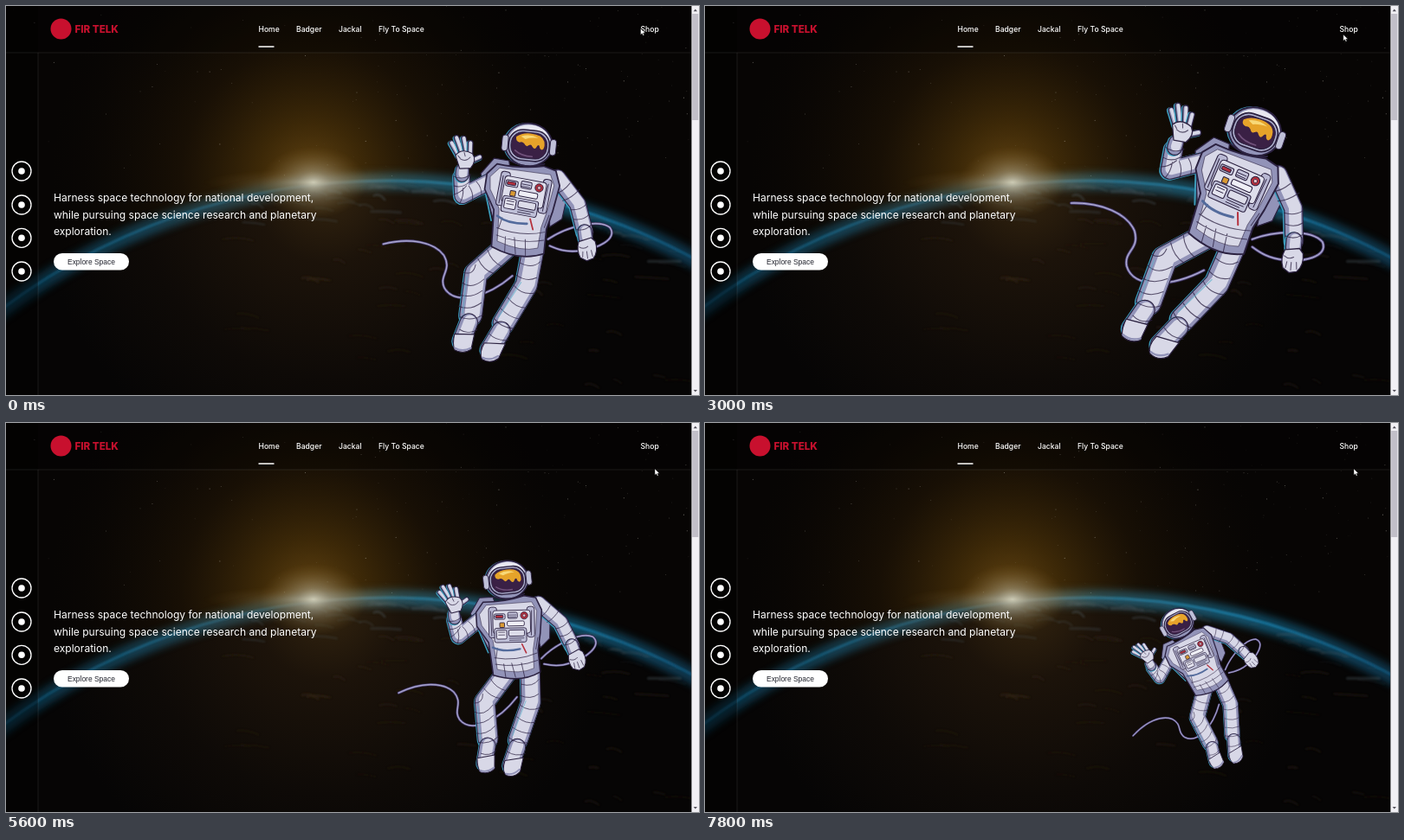
An HTML page that plays this animation: 800x450 px, repeating every 8 s.

```html
<!DOCTYPE html>
<html lang="en">
<head>
<meta charset="utf-8">
<title>Space landing page</title>
<style>
  html, body { margin: 0; width: 100%; height: 100%; overflow: hidden; background: #050404; }
  svg { display: block; width: 100%; height: 100%; }
  text { font-family: Inter, sans-serif; fill: #fff; }
  .round { fill: none; stroke-linecap: round; stroke-linejoin: round; }
  .nav { font-size: 8.6px; font-weight: 500; }
  .lead { font-size: 12.05px; }
</style>
</head>
<body>
<svg viewBox="0 0 800 450" preserveAspectRatio="none">
  <defs>
    <radialGradient id="warm" gradientUnits="userSpaceOnUse" cx="352" cy="195" r="300">
      <stop offset="0" stop-color="#6b4a14" stop-opacity=".9"/>
      <stop offset=".2" stop-color="#513609" stop-opacity=".72"/>
      <stop offset=".5" stop-color="#291a06" stop-opacity=".5"/>
      <stop offset="1" stop-color="#120b04" stop-opacity="0"/>
    </radialGradient>
    <radialGradient id="sun">
      <stop offset="0" stop-color="#d5d3bd" stop-opacity=".9"/>
      <stop offset=".3" stop-color="#a5a08a" stop-opacity=".55"/>
      <stop offset="1" stop-color="#7a5a20" stop-opacity="0"/>
    </radialGradient>
    <radialGradient id="ground" gradientUnits="userSpaceOnUse" cx="370" cy="215" r="330">
      <stop offset="0" stop-color="#33240f"/>
      <stop offset=".25" stop-color="#1c130a"/>
      <stop offset=".65" stop-color="#0e0a07"/>
      <stop offset="1" stop-color="#060505"/>
    </radialGradient>
    <linearGradient id="rim" gradientUnits="userSpaceOnUse" x1="0" x2="790" y1="0" y2="0">
      <stop offset="0" stop-color="#0d4a68"/>
      <stop offset=".2" stop-color="#1b6484"/>
      <stop offset=".38" stop-color="#3f6670"/>
      <stop offset=".47" stop-color="#6f7a72"/>
      <stop offset=".57" stop-color="#2f7c98"/>
      <stop offset=".8" stop-color="#1a81ad"/>
      <stop offset="1" stop-color="#125a80"/>
    </linearGradient>
    <filter id="soft" x="-20%" y="-20%" width="140%" height="140%"><feGaussianBlur stdDeviation="5"/></filter>
    <filter id="haze" x="-20%" y="-20%" width="140%" height="140%"><feGaussianBlur stdDeviation="1.3"/></filter>
    <clipPath id="planet"><circle cx="440" cy="942" r="740"/></clipPath>
    <clipPath id="page"><rect width="791" height="450"/></clipPath>
  </defs>

  <g clip-path="url(#page)">
    <rect width="800" height="450" fill="#070504"/>
    <rect width="800" height="450" fill="url(#warm)"/>
    <g id="stars" fill="#c9c3b8"></g>
    <circle cx="440" cy="942" r="742" fill="none" stroke="url(#rim)" stroke-width="13" opacity=".55" filter="url(#soft)"/>
    <circle cx="440" cy="942" r="740" fill="url(#ground)"/>
    <g clip-path="url(#planet)">
      <circle cx="440" cy="942" r="738" fill="none" stroke="url(#rim)" stroke-width="16" opacity=".6" filter="url(#soft)"/>
      <g id="clouds" class="round" filter="url(#haze)"></g>
    </g>
    <circle cx="440" cy="942" r="740" fill="none" stroke="url(#rim)" stroke-width="3" opacity=".85" filter="url(#haze)"/>
    <ellipse cx="355" cy="204" rx="62" ry="42" fill="url(#sun)"/>
    <ellipse cx="352" cy="204" rx="125" ry="16" fill="url(#sun)" opacity=".4"/>
    <rect width="37" height="450" fill="#000" opacity=".3"/>
    <rect width="791" height="54" fill="#000" opacity=".25"/>
    <path d="M0 54H791M37 54V450" stroke="#fff" stroke-opacity=".11" stroke-width=".8"/>
  </g>

  <g id="astronaut"></g>

  <circle cx="63.5" cy="26.5" r="12" fill="#c8102e"/>
  <text x="79.5" y="31" style="font-size:11.6px;font-weight:800;fill:#c8102e">FIR TELK</text>
  <g class="nav">
    <text x="291.5" y="30.2">Home</text>
    <text x="335" y="30.2">Badger</text>
    <text x="384" y="30.2">Jackal</text>
    <text x="430" y="30.2">Fly To Space</text>
    <text x="732.5" y="30.2">Shop</text>
  </g>
  <rect x="291.5" y="46.3" width="18" height="1.5" fill="#fff"/>
  <g class="lead">
    <text x="55" y="226.3">Harness space technology for national development,</text>
    <text x="55" y="245.6">while pursuing space science research and planetary</text>
    <text x="55" y="264.9">exploration.</text>
  </g>
  <rect x="55" y="286" width="87" height="19.6" rx="9.8" fill="#fff"/>
  <text x="71" y="298.9" style="font:8.45px 'Liberation Sans',sans-serif;fill:#20222c">Explore Space</text>
  <g id="social" fill="none" stroke="#fff" stroke-width="1.3"></g>

  <rect x="791.4" width="8.6" height="450" fill="#f1f0f4"/>
  <rect x="792.2" y="9" width="7" height="123" fill="#c1bfc8"/>
  <path d="M793.6 6.2h4.4l-2.2-2.6zM793.6 444h4.4l-2.2 2.6z" fill="#55535c"/>
  <path id="cursor" d="M0 0V7.2L1.7 5.7L2.9 8.3L4.1 7.8L3 5.3H5.3Z" fill="#fff" stroke="#111" stroke-width=".4"/>
</svg>

<script>
const $ = id => document.getElementById(id);
const INK = '#2b2140', SHADE = '#9293b8', LIGHT = '#d8d8e7', RIM = '#3d9dbd', RED = '#b5303c';

let seed = 11;
const random = () => (seed = (seed * 16807) % 2147483647) / 2147483647;
const repeat = (n, make) => Array.from({ length: n }, (_, i) => make(i)).join('');

$('stars').innerHTML = repeat(170, () => {
  const x = 791 * Math.pow(random(), .65), y = 200 * random();
  return `<circle cx="${x}" cy="${y}" r="${.25 + .4 * random()}" opacity="${.12 + .4 * random()}"/>`;
});

$('clouds').innerHTML = repeat(90, () => {
  const x = 250 + 520 * random(), depth = 5 + 200 * random() ** 2;
  const y = 942 - Math.sqrt(740 ** 2 - (x - 440) ** 2) + depth;
  const w = 8 + 30 * random(), tone = depth < 40 ? '#53646a' : '#3a2b1b';
  return `<path d="M${x} ${y}q${w / 2} ${-4 + 5 * random()} ${w} ${5 * random()}" stroke="${tone}"
    stroke-width="${1 + 2.5 * random()}" opacity="${.12 + .25 * random()}"/>`;
});

$('social').innerHTML = [191, 230, 268.3, 307].map(y =>
  `<circle cx="18" cy="${y}" r="11"/><circle cx="18" cy="${y}" r="3.8" fill="#fff" stroke="none"/>`).join('');

// Drawing helpers for the astronaut
const line = (d, color, width, extra = '') =>
  `<path class="round" d="${d}" stroke="${color}" stroke-width="${width}" ${extra}/>`;
const limb = (d, w) =>
  line(d, RIM, w + 3, 'transform="translate(-1.2 .6)"') + line(d, INK, w + 2.4) + line(d, SHADE, w) +
  line(d, LIGHT, w * .7, `transform="translate(${w * .08} ${-w * .07})"`);
const shape = (d, fill, width = 1.3) =>
  `<path d="${d}" fill="${fill}" stroke="${INK}" stroke-width="${width}" stroke-linejoin="round"/>`;
const box = (x, y, w, h, fill, r = 2) =>
  `<rect x="${x}" y="${y}" width="${w}" height="${h}" rx="${r}" fill="${fill}" stroke="${INK}" stroke-width="1.1"/>`;
const rope = d => line(d, INK, 4) + line(d, '#7770a8', 2.6) + line(d, '#c0bddb', .9);
const creases = d => line(d, INK, 1.1, 'opacity=".75"');

const tether = rope('M422 223C458 223 487 237 495 257C501 279 482 280 485 298C492 325 537 324 575 305') +
  rope('M632 270C660 260 702 260 714 275C721 293 690 298 669 295C651 293 641 286 632 279');

const pack = shape('M568 165L590 150L608 158L598 240L569 231Z', SHADE) +
  shape('M655 186L672 194L674 214L656 249L638 255Z', SHADE) +
  line('M569 169L566 228', RIM, 2);

const legs =
  limb('M610 278L590 321L549 362', 27) +
  limb('M577 266L530 290L510 341', 28) +
  limb('M505 350L490 371', 22) + limb('M543 371L523 391', 23) +
  shape('M483 360Q477 372 478 380Q487 389 499 385L508 367Z', LIGHT) +
  shape('M518 381Q507 392 510 401Q519 410 531 405L544 389Z', LIGHT) +
  line('M479 378Q487 386 499 383M511 399Q519 406 531 402', SHADE, 2.5) +
  creases('M495 340Q508 350 525 345M497 326Q510 336 527 329M501 311Q514 321 532 314M509 297Q519 310 538 300' +
    'M514 285Q526 292 532 279M537 272Q540 288 552 296M552 264Q553 280 565 290M491 356Q500 366 513 362' +
    'M538 353Q544 367 559 372M550 343Q557 356 570 362M562 331Q569 347 582 350M574 318Q581 333 598 334' +
    'M580 305Q591 318 605 315M589 291Q602 303 615 296M527 371Q534 383 549 385') +
  line('M517 292L500 336M584 316L544 353', '#63b1cc', 1.4, 'opacity=".65"');

const hand = ['M546 135L541 117', 'M551 132L549 112', 'M557 133L558 115', 'M561 137L565 123', 'M561 146L572 144']
  .map(d => limb(d, 5.2)).join('') +
  shape('M542 134Q552 126 564 137Q568 147 557 155L543 152Z', LIGHT) +
  creases('M547 140Q553 146 560 141M545 135L547 139M554 133L554 138');

const wavingArm = limb('M543 163L538 187L577 178', 20) + limb('M546 155L544 161', 16) + hand +
  creases('M533 160Q543 168 555 163M530 172Q540 178 551 172M527 183Q537 183 546 176M532 196Q539 189 541 178' +
    'M549 196Q553 187 549 177M562 193Q565 183 560 174');

const restingArm = limb('M664 195L681 235L681 273', 20) + limb('M681 272L680 281', 17) +
  shape('M670 283Q664 293 667 304L674 310L683 309Q692 302 691 288L687 282Z', LIGHT) +
  creases('M672 297L670 304M677 298L676 307M683 298L683 306M669 290Q674 295 680 292' +
    'M656 214Q665 216 678 206M663 226Q674 226 688 217M670 240Q682 244 692 238M671 253Q682 258 692 252M671 267Q681 272 691 266');

const torso = shape('M592 158L576 167L568 186L573 215L565 240L558 261Q589 290 622 287L633 257L647 236L664 206L664 186L650 176Q620 172 592 158Z', SHADE, 2) +
  shape('M594 164L579 172L575 188L580 215L573 238L567 256Q594 278 616 278L627 253L642 231L657 204L656 189Z', LIGHT, .6) +
  creases('M571 239Q597 258 630 260M568 248Q594 267 626 270M579 253L573 272M603 263L598 284M590 257L586 278M581 228L573 240M641 240L631 254') +
  `<g transform="translate(615 205) rotate(25)">
    ${box(-33, -25, 12, 45, '#b8b8d3', 4)}${box(23, -25, 11, 45, '#b8b8d3', 4)}
    ${box(-27, -20, 55, 34, '#dedeeb', 4)}${box(-25, -15, 16, 8, '#c9c9de')}
    ${box(-23, -13, 11, 4, RED, 1)}${box(-5, -17, 14, 9, '#c5c5dc')}
    <circle cx="19" cy="-12" r="5.3" fill="${RED}" stroke="${INK}"/>
    <circle cx="19" cy="-12" r="2.2" fill="#e8bfc4" stroke="${INK}" stroke-width=".8"/>
    ${box(-25, 6, 47, 21, '#bfc0d8', 3)}${box(-22, 9, 15, 13, '#e4e4ef')}${box(-4, 9, 23, 9, '#dcdce9')}
    ${box(-17, -2, 7, 7, '#d99a33', 1)}${box(-6, -4, 25, 7, '#efeff6')}
    ${line('M-3 21H18M-3 24H14M-4 -13H7M-4 -10H7M-19 12H-10M-19 16H-10', INK, .9)}
    ${line('M-30 -19L-29 17M30 -19L29 17', INK, 1)}
    ${line('M-28 34Q-12 42 12 37', '#536b9c', 3)}${line('M15 30L21 43', RED, 2)}
  </g>`;

const helmet = `<g transform="translate(638 144) rotate(20)">
    <ellipse cx="-1.5" rx="32" ry="28.5" fill="${RIM}"/>
    <ellipse rx="31" ry="28" fill="${SHADE}" stroke="${INK}" stroke-width="2"/>
    <path d="M-27 -7Q-20 -26 2 -26Q22 -25 28 -7Q14 -21 -2 -20Q-18 -19 -27 -7Z" fill="#e8e8f1"/>
    ${box(-35, -10, 8, 21, '#bfc0d8', 4)}${box(28, -10, 8, 21, '#bfc0d8', 4)}
    <rect x="-26" y="-19" width="53" height="40" rx="18" fill="#b0b0cf" stroke="${INK}" stroke-width="1.8"/>
    <rect x="-23" y="-16" width="47" height="34" rx="15" fill="#3a2045" stroke="${INK}"/>
    <path d="M-17 -9Q-10 -15 1 -15Q17 -15 20 -6Q22 3 18 5Q15 5 14 0Q12 -2 10 3Q8 6 5 2Q3 -2 0 1Q-3 4 -6 -1Q-9 -4 -12 -2Q-18 -3 -17 -9Z" fill="#e6a32a"/>
    <path d="M-11 -10Q0 -15 12 -10Q1 -10 -5 -7Z" fill="#f8d978"/>
    ${line('M-17 9Q-8 16 6 15', '#70517b', 1.8)}
    ${line('M-22 23Q0 33 23 23', INK, 2)}
  </g>`;

$('astronaut').innerHTML = tether + pack + legs + wavingArm + restingArm + torso + helmet;

// Tilt in degrees over time; size and height follow the tilt.
const sway = [[0, 14.3], [1200, 4.6], [2200, 0], [3800, 4.8], [4800, 14.9], [6400, 37], [7800, 48.3], [8000, 49.2]];

function slope(i) {
  const [t0, v0] = sway[Math.max(i - 1, 0)], [t1, v1] = sway[Math.min(i + 1, sway.length - 1)];
  return (v1 - v0) / (t1 - t0);
}

function tiltAt(t) {
  const i = sway.findIndex((_, k) => t < sway[k + 1][0]);
  const [t0, a] = sway[i], [t1, b] = sway[i + 1], span = t1 - t0, u = (t - t0) / span;
  const bend = u * (1 - u) * span;
  return a + (b - a) * u * u * (3 - 2 * u) + bend * ((1 - u) * slope(i) - u * slope(i + 1));
}

const LOOP = 8000, STEP = 200;
const start = performance.now();

function draw() {
  const elapsed = (performance.now() - start) % LOOP;
  const t = Math.floor(elapsed / STEP) * STEP;
  const tilt = tiltAt(t);
  $('astronaut').setAttribute('transform',
    `translate(570 ${258 + 1.05 * tilt}) rotate(${-tilt}) scale(${1 - .0081 * tilt}) translate(-570 -258)`);
  const u = Math.min(1, Math.max(0, (t - 2800) / 600)), glide = u * u * (3 - 2 * u);
  $('cursor').setAttribute('transform', `translate(${732.6 + 16.4 * glide} ${26 + 27 * glide})`);
  requestAnimationFrame(draw);
}
draw();
</script>
</body>
</html>
```
